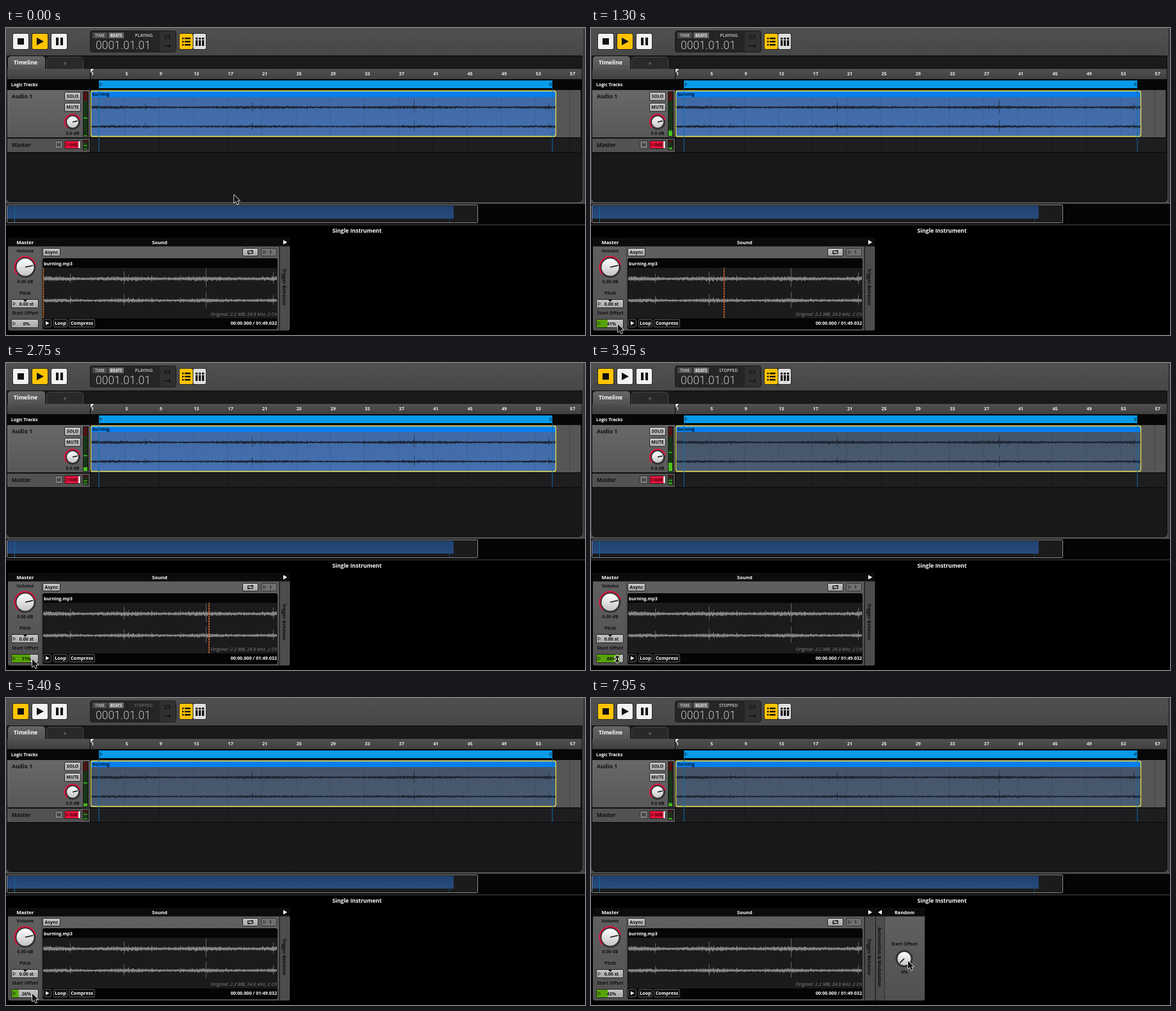
Animation, 904 px wide and 480 px high, one loop 8 s. Source, as an HTML page with a canvas:

```html
<!DOCTYPE html>
<html lang="en">
<head>
<meta charset="utf-8">
<title>Start offset</title>
<style>
html, body { margin: 0; width: 100%; height: 100%; overflow: hidden; background: #000; }
canvas { display: block; }
</style>
</head>
<body>
<canvas id="stage" width="904" height="480"></canvas>
<script>
const ctx = document.getElementById('stage').getContext('2d');
const LOOP = 8000, STOP_AT = 3400, MENU = [5700, 7000], SUBMENU_AT = 5900, HOVER = [3300, 4100];

// Keyframes: [time, ...values]
const cursorKeys = [[100, 356, 261], [950, 42, 463], [2750, 41, 463], [5680, 41, 462], [5880, 80, 435],
  [6200, 160, 434], [6350, 163, 436], [6600, 167, 458], [6900, 180, 434], [7050, 180, 434], [7800, 495, 411]];
const offsetKeys = [[950, 0], [1300, 41], [2750, 71], [3300, 88], [4100, 88], [5400, 26], [5650, 42]];
const meterKeys = [[0, 168, 140], [1300, 162, 160], [2750, 163, 144], [3950, 156, 139], [5400, 165, 132],
  [6600, 167, 150], [7950, 166, 164]];

const within = (t, [a, b]) => t >= a && t < b;
const smooth = p => p * p * (3 - 2 * p);
const linear = p => p;

function tween(keys, t, ease = linear) {
  const i = keys.findIndex(k => k[0] > t);
  if (i === 0) return keys[0].slice(1);
  if (i < 0) return keys[keys.length - 1].slice(1);
  const a = keys[i - 1], b = keys[i];
  const e = ease((t - a[0]) / (b[0] - a[0]));
  return a.slice(1).map((v, j) => v + (b[j + 1] - v) * e);
}

function rect(x, y, w, h, fill, radius = 0, stroke, line = 1) {
  ctx.beginPath();
  ctx.roundRect(x, y, w, h, radius);
  if (fill) { ctx.fillStyle = fill; ctx.fill(); }
  if (stroke) { ctx.strokeStyle = stroke; ctx.lineWidth = line; ctx.stroke(); }
}

function shade(y, h, top, bottom) {
  const g = ctx.createLinearGradient(0, y, 0, y + h);
  g.addColorStop(0, top);
  g.addColorStop(1, bottom);
  return g;
}

function text(s, x, y, size, fill = '#fff', align = 'left', style = 'bold', family = '"Open Sans", sans-serif') {
  ctx.font = `${style} ${size}px ${family}`;
  ctx.textAlign = align;
  ctx.fillStyle = fill;
  ctx.fillText(s, x, y + size * 0.36);
}

function poly(points, fill, stroke, line = 1) {
  ctx.beginPath();
  points.forEach(([x, y]) => ctx.lineTo(x, y));
  ctx.closePath();
  if (fill) { ctx.fillStyle = fill; ctx.fill(); }
  if (stroke) { ctx.strokeStyle = stroke; ctx.lineWidth = line; ctx.stroke(); }
}

function triangle(x, y, w, h, fill, stroke) {
  poly([[x, y - h / 2], [x + w, y], [x, y + h / 2]], fill, stroke, 0.8);
}

function line(x1, y1, x2, y2, color, width = 1) {
  ctx.beginPath();
  ctx.moveTo(x1, y1);
  ctx.lineTo(x2, y2);
  ctx.strokeStyle = color;
  ctx.lineWidth = width;
  ctx.stroke();
}

function button(x, y, w, h, label, size = 7) {
  rect(x + .5, y + .5, w - 1, h - 1, shade(y, h, '#c8c8c8', '#a4a4a4'), 1.5, '#222');
  if (label) text(label, x + w / 2, y + h / 2, size, '#111', 'center');
}

function sideways(s, x, y, size, color) {
  ctx.save();
  ctx.translate(x, y);
  ctx.rotate(Math.PI / 2);
  text(s, 0, 0, size, color, 'center');
  ctx.restore();
}

function knob(x, y, r, angle, ring) {
  ctx.beginPath();
  ctx.arc(x, y, r + 3, 0, 7);
  ctx.fillStyle = '#333';
  ctx.fill();
  if (ring) {
    ctx.beginPath();
    ctx.arc(x, y, r + 3, Math.PI * .75, angle);
    ctx.strokeStyle = ring;
    ctx.lineWidth = 2;
    ctx.stroke();
  }
  ctx.beginPath();
  ctx.arc(x, y, r, 0, 7);
  ctx.fillStyle = shade(y - r, 2 * r, '#fff', '#c4c4c4');
  ctx.fill();
  line(x, y, x + Math.cos(angle) * (r - 1), y + Math.sin(angle) * (r - 1), '#111', 1.7);
}

const noise = n => { const v = Math.sin(n * 127.1 + 11.7) * 43758.5453; return v - Math.floor(v); };
const spikes = [[.117, 2.8], [.347, 4], [.365, 2], [.465, 1.8], [.588, 1.8], [.696, 5.6], [.985, 3.4]];

function waveform(x, width, y, amp, color, seed) {
  ctx.fillStyle = color;
  for (let i = 0; i < width; i++) {
    const spike = spikes.find(([u]) => Math.floor(u * width) === i);
    const swell = 1 + .2 * Math.sin(i / width * 19 + 1);
    const reach = n => amp * swell * (.5 + .7 * noise(n + seed) ** 2);
    const up = reach(i), down = reach(i + 900);
    ctx.fillRect(x + i, y - up, 1, up + down);
    if (!spike) continue;
    ctx.globalAlpha = .7;
    ctx.fillRect(x + i, y - amp * spike[1], 1, amp * spike[1] * 1.8);
    ctx.globalAlpha = 1;
  }
}

function toolbar(t) {
  const playing = t < STOP_AT;
  rect(0, 0, 904, 44, shade(0, 44, '#505050', '#474747'));
  [11, 41, 71].forEach((x, i) => {
    const active = i === (playing ? 1 : 0);
    rect(x - 1, 8, 26, 26, '#2a2a2a', 3);
    rect(x, 9, 24, 24, active ? '#ffc400' : '#f2f2f2', 2);
  });
  rect(18, 16, 10, 10, '#111');
  triangle(48, 21, 11, 12, '#111');
  rect(78, 15, 4, 12, '#111');
  rect(85, 15, 4, 12, '#111');

  rect(131.5, 4.5, 134, 33, '#252525', 3, '#181818');
  rect(240, 5, 25, 32, '#303030', 2);
  rect(135, 7, 23, 9, '#494949', 1);
  rect(160, 7, 24, 9, '#656565', 1);
  text('TIME', 146.5, 11.5, 6.2, '#bbb', 'center');
  text('BEATS', 172, 11.5, 6.2, '#eee', 'center');
  const dim = within(t, [5200, 5600]);
  text(playing ? 'PLAYING' : 'STOPPED', 229, 11.5, 6.6, dim ? '#666' : '#d0d0d0', 'right', '600');
  text('0001.01.01', 140, 26.5, 17.5, '#c4c4c4', 'left', '300', 'Roboto, sans-serif');
  loopIcon(252, 14, '#151515');
  line(247, 28, 255, 28, '#151515', 1.5);
  triangle(254, 28, 4, 6, '#151515');

  rect(270, 8, 43, 26, '#2a2a2a', 3);
  rect(271, 9, 20.5, 24, '#ffc400', 2);
  rect(292.5, 9, 19.5, 24, '#dedede', 2);
  for (let i = 0; i < 3; i++) {
    rect(275, 15 + i * 5, 2.5, 2.5, '#111');
    rect(279, 15 + i * 5, 9, 2.5, '#111');
    rect(296 + i * 5, 15, 3.3, 3, '#111');
    rect(296 + i * 5, 19, 3.3, 9, '#111');
  }
}

function loopIcon(x, y, color) {
  line(x - 4, y + 1, x - 4, y - 2, color, 1.2);
  line(x - 4, y - 2, x + 3, y - 2, color, 1.2);
  line(x + 4, y - 1, x + 4, y + 2, color, 1.2);
  line(x + 4, y + 2, x - 3, y + 2, color, 1.2);
  triangle(x + 2, y - 2, 3, 4, color);
  triangle(x - 2, y + 2, -3, 4, color);
}

function timeline(t) {
  rect(0, 44, 904, 232, '#4a4a4a');
  rect(1.5, 43.5, 898, 228, '#1a1a1a', [0, 0, 5, 5], '#0a0a0a');
  rect(3, 44, 58, 24, shade(44, 22, '#666', '#515151'), [5, 5, 0, 0]);
  rect(63.5, 45.5, 57, 22, '#292929', [5, 5, 0, 0], '#484848');
  text('Timeline', 12, 53.5, 8.65);
  text('+', 92, 55, 10, '#6a6a6a', 'center');

  rect(2, 64, 897, 16, shade(64, 16, '#505050', '#404040'));
  for (let i = 0; i < 15; i++) text(String(1 + 4 * i), 133 + 53.4 * i, 71, 7.1, '#eee');
  poly([[131, 64], [137, 64], [132, 70]], '#fff');

  rect(2, 80, 897, 191, '#18171a', [0, 0, 4, 4]);
  rect(2, 80, 897, 17, '#070707');
  text('Logic Tracks', 8, 88.5, 6.9);
  rect(145, 82, 708, 12, '#079be9');
  triangle(146, 88, 5, 8, '#06659a');
  triangle(852, 88, -5, 8, '#06659a');

  rect(2, 97, 129, 74, shade(97, 74, '#686868', '#585858'));
  rect(131, 97, 766, 74, '#565656');
  rect(2, 173, 129, 21, '#525252');
  rect(131, 173, 766, 21, '#1e1d20');
  line(2, 171.5, 897, 171.5, '#080808');
  line(2, 194.5, 897, 194.5, '#080808');
  line(131.5, 64, 131.5, 194, '#080808');
  for (let i = 1; i < 15; i++) line(132.5 + 53.4 * i, 97, 132.5 + 53.4 * i, 194, 'rgba(0,0,0,.18)');

  text('Audio 1', 9, 107, 8.6, '#111');
  button(91, 100, 26, 14, 'SOLO', 6.8);
  button(91, 117, 26, 14, 'MUTE', 6.8);
  knob(104, 147, 9, -.22, '#e3123f');
  text('0.0 dB', 104, 164.5, 7, '#111', 'center');
  text('Master', 9, 182.5, 8.5, '#111');
  rect(76.5, 176.5, 12, 12, '#777', 1.5, '#333');
  text('M', 82.5, 182.5, 6.8, '#222', 'center');
  rect(91.5, 176.5, 25, 12, '#e8123d', 1.5, '#222');
  rect(113, 177, 3, 11, '#d8d8d8');
  triangle(94, 182.5, 4, 5, null, '#300');
  text('0dB', 105.5, 182.5, 6.6, '#400010', 'center');
  meters(t);
  clip(t < STOP_AT);
}

function meters(t) {
  const [fill, peak] = tween(meterKeys, t);
  rect(120, 99, 9, 71, '#1b1b1b');
  rect(121, 100, 6, 14, '#4e1212');
  rect(121, 114, 6, 55, '#173517');
  rect(121, fill, 6, 169 - fill, '#49c21d');
  rect(121, peak, 6, 1.5, '#3fc42a');
  rect(120, 175, 9, 16, '#1b1b1b');
  rect(121, 176, 6, 14, '#173517');
  rect(121, 176, 6, 3, '#4e1212');
  rect(121, 175 + (fill - 100) / 5, 6, 15 - (fill - 100) / 5, '#2d8a1d');
  rect(121, 175 + (peak - 100) / 5, 6, 1.2, '#49c21d');
}

function clip(playing) {
  rect(132.5, 98.5, 726, 71, playing ? shade(108, 62, '#4069a5', '#4570af') : shade(108, 62, '#455467', '#4a5c73'), 3);
  rect(133, 99, 725, 9, '#087fee', [2, 2, 0, 0]);
  for (let i = 1; i < 14; i++) line(132.5 + 53.4 * i, 108, 132.5 + 53.4 * i, 169, 'rgba(0,0,0,.1)');
  text('burning', 135, 104, 6.8, '#05172b');
  waveform(133, 725, 124, 2, '#1c2533', 3);
  waveform(133, 725, 154, 1.7, '#1c2533', 60);
  rect(132.5, 98.5, 726, 71, null, 3, '#e6dc4a', 1.3);
  [145, 853].forEach(x => line(x, 95, x, 194, '#0a6fae'));
}

function overview() {
  rect(0, 275, 904, 33, '#050505');
  rect(2, 277, 734, 27, '#1b1b1b');
  rect(1, 278, 698, 20, shade(278, 20, '#22416e', '#284b7e'));
  line(13.5, 278, 13.5, 304, '#126ba3');
  line(692.5, 278, 692.5, 304, '#174a70');
  rect(1.5, 276.5, 735, 28, null, 1, '#8c8c8c');
}

function field(y, label, percent) {
  rect(8.5, y + .5, 42, 13, shade(y, 14, '#c8c8c8', '#a4a4a4'), 1.5, '#222');
  if (percent) rect(9, y + 1, 41 * percent / 100, 12, '#57a405');
  triangle(11, y + 7, 4, 5, null, '#222');
  text(label, 32, y + 7, 7, '#111', 'center');
}

function panel(x, w) {
  rect(x, 328, w, 145, shade(341, 132, '#606060', '#505050'), 3);
  rect(x, 328, w, 13.5, '#0c0c0c', [3, 3, 0, 0]);
}

function instrument(t) {
  const [offset] = tween(offsetKeys, t);
  rect(0, 307, 904, 173, '#000');
  rect(0, 307, 904, 1.5, '#333');
  text('Single Instrument', 548, 316.5, 8.65, '#fff', 'center');

  panel(3, 440);
  text('Master', 30, 335, 7.7, '#fff', 'center');
  text('Sound', 240, 335, 7.7, '#fff', 'center');
  triangle(433, 335, 6, 7, '#fff');
  line(55.5, 342, 55.5, 473, '#444');

  text('Volume', 30, 348, 7.1, '#111', 'center');
  knob(30, 374, 13.5, -.22, '#e3123f');
  text('0.00 dB', 30, 396.5, 7, '#111', 'center');
  text('Pitch', 30, 414.5, 7.1, '#111', 'center');
  field(424, '0.00 st', 0);
  poly([[27, 425], [33, 425], [30, 428.5]], '#111');
  text('Start Offset', 30, 445, 7.05, '#111', 'center');
  field(455, Math.round(offset) + '%', offset);

  button(57, 344, 28, 13, 'Async', 7.1);
  button(369, 344, 25, 13);
  loopIcon(381.5, 350.5, '#111');
  rect(398.5, 344.5, 24, 12, '#707070', 1.5, '#333');
  triangle(402, 350.5, 4, 5, null, '#222');
  text('1', 413, 350.5, 7, '#222', 'center');

  rect(57, 360, 367, 111, '#050505', 3);
  text('burning.mp3', 59, 368, 7);
  rect(58, 375, 366, 79, '#1b1a1c');
  waveform(58, 365, 392, 2.9, '#858585', 3);
  waveform(58, 365, 426, 2.5, '#858585', 60);
  text('Original: 2.2 MB, 24.0 kHz, 2 Ch', 423, 447.5, 7.5, '#858585', 'right', 'italic');
  [[58, 13, ''], [74, 22, 'Loop'], [98, 41, 'Compress']].forEach(([x, w, label]) => {
    rect(x + .5, 455.5, w - 1, 12, '#111', 1.5, '#555');
    text(label, x + w / 2, 461.5, 7.2, '#fff', 'center');
  });
  triangle(62, 461.5, 5.5, 6, '#fff');
  text('00:00.000 / 01:49.032', 423, 461.5, 7.2, '#fff', 'right');

  if (t < STOP_AT) {
    const x = 58.5 + offset / 100 * 364;
    line(x, 375, x, 454, '#a83e1c', 1.2);
    ctx.setLineDash([2, 2]);
    line(x, 375, x, 454, '#d8903a', 1.2);
    ctx.setLineDash([]);
  }

  rect(426, 342, 2, 131, '#2c2c2c');
  rect(428, 342, 14, 131, '#4c4c4c');
  sideways('Trigger Behavior', 434.5, 405, 7.1, '#0c0c0c');
}

function modulation() {
  panel(443, 78);
  rect(443, 342, 2, 131, '#2c2c2c');
  rect(445, 342, 13, 131, '#4c4c4c');
  line(458.5, 342, 458.5, 473, '#333');
  triangle(454, 335, -6, 7, '#fff');
  text('Random', 489.5, 335, 7.5, '#fff', 'center');
  sideways('Automation & Modulation', 450.5, 405, 7.1, '#0c0c0c');
  text('Start Offset', 489, 384.5, 7.05, '#111', 'center');
  knob(489, 407.5, 10.5, Math.PI * .75);
  text('0%', 489.5, 428.5, 7, '#111', 'center');
}

function menu(t, [cx, cy]) {
  rect(41, 409, 106, 53, '#252525', 2);
  if (t >= SUBMENU_AT) rect(41, 427, 106, 16, '#383838');
  ['Add Automation', 'Add Modulation', 'Copy Property'].forEach((s, i) =>
    text(s, 59, [418, 434.5, 452.5][i], 8.4));
  triangle(138, 434.5, 3.5, 5, '#888');
  if (t < SUBMENU_AT) return;
  rect(147, 425, 76, 60, '#252525', 2);
  const hover = Math.floor((cy - 425) / 16);
  if (cx > 147) rect(147, 426 + hover * 16, 76, 16, '#464646');
  ['Random', 'AHDSR', 'LFO', 'Sidechain'].forEach((s, i) => text(s, 164, 434.5 + 16 * i, 8.4));
}

function pointer([x, y], resizing) {
  ctx.save();
  ctx.translate(x, y);
  ctx.lineJoin = 'round';
  const shape = resizing
    ? [[0, -6], [4, -2], [1, -2], [1, 2], [4, 2], [0, 6], [-4, 2], [-1, 2], [-1, -2], [-4, -2]]
    : [[0, 0], [0, 12.5], [2.9, 9.8], [5, 14.5], [7.2, 13.5], [5.2, 9], [9, 9]];
  poly(shape, '#111', '#fff', resizing ? 1.8 : 1.4);
  poly(shape, '#111');
  ctx.restore();
}

function draw(t) {
  const position = tween(cursorKeys, t, smooth);
  toolbar(t);
  timeline(t);
  line(902.5, 0, 902.5, 272, '#1a1a1a');
  overview();
  instrument(t);
  if (t >= MENU[1]) modulation();
  if (within(t, MENU)) menu(t, position);
  pointer(position, within(t, HOVER));
}

const start = performance.now();
function frame() {
  draw((performance.now() - start) % LOOP);
  requestAnimationFrame(frame);
}
frame();
</script>
</body>
</html>
```
